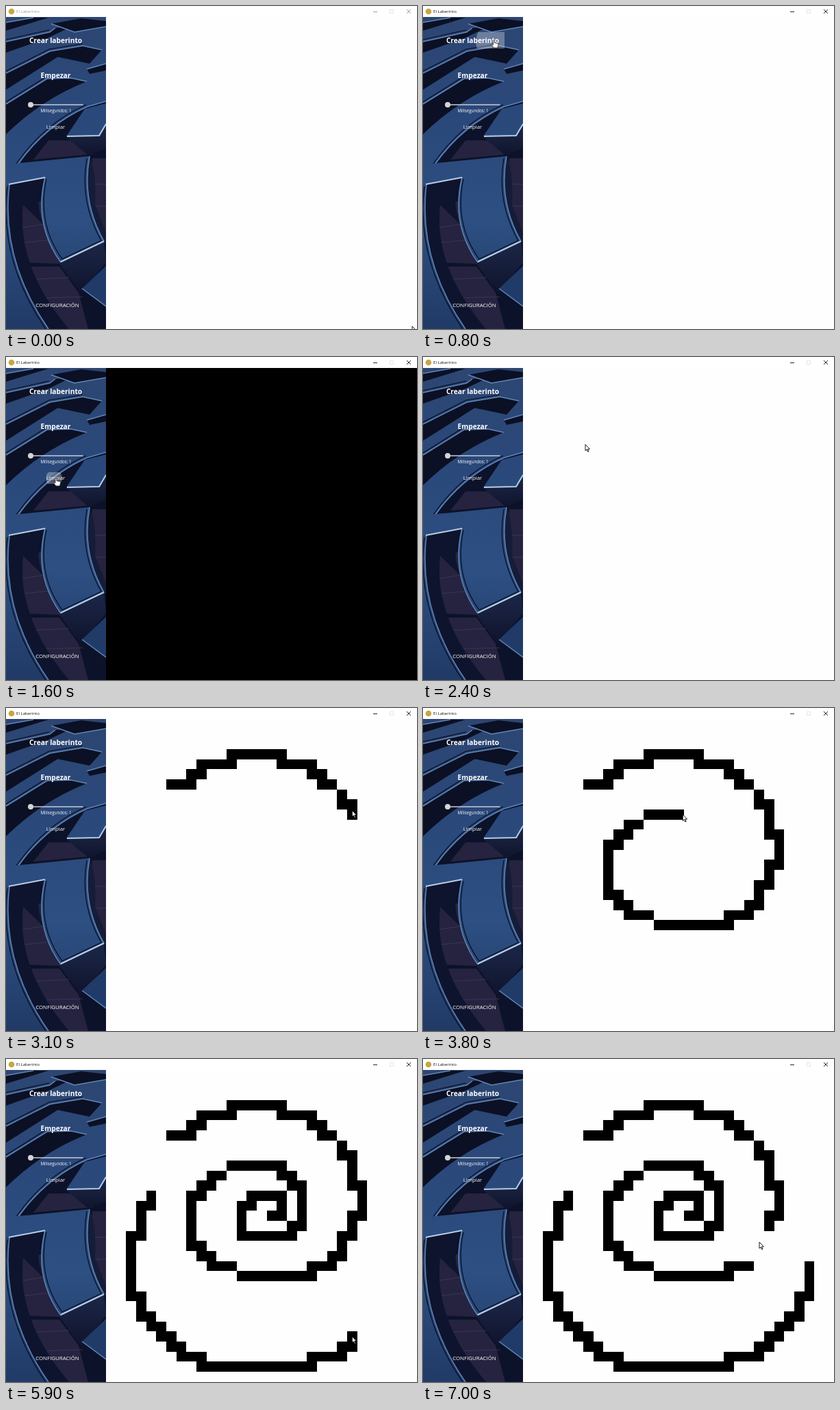
Animation of 600 by 471 pixels, one loop 7.1 s. Source, as an HTML page:

```html
<!DOCTYPE html>
<html lang="es">
<head>
<meta charset="utf-8">
<title>El Laberinto</title>
<style>
html, body { margin: 0; width: 100%; height: 100%; overflow: hidden; background: #fff; }
svg { display: block; width: 600px; height: 471px; }
text { font-family: "Open Sans", "Noto Sans", sans-serif; }
.side text { fill: #fff; text-anchor: middle; }
.bold { font-weight: 700; font-size: 10.2px; }
.top { fill: url(#steel); }
.rim { fill: none; stroke: #5f86ba; stroke-width: 1.5; }
.shine { fill: none; stroke: #b9cde6; stroke-width: 2; }
.seam { fill: none; stroke: #070b1c; stroke-width: 1.2; }
</style>
</head>
<body>
<svg viewBox="0 0 600 471">
  <defs>
    <linearGradient id="steel" gradientUnits="userSpaceOnUse" x1="0" y1="16" x2="0" y2="471">
      <stop offset="0" stop-color="#2d4672"/>
      <stop offset=".3" stop-color="#2a487a"/>
      <stop offset=".65" stop-color="#2d4f82"/>
      <stop offset="1" stop-color="#213a66"/>
    </linearGradient>
    <linearGradient id="face" x1="0" y1="0" x2="0" y2="1">
      <stop offset="0" stop-color="#1b2748"/>
      <stop offset="1" stop-color="#10142c"/>
    </linearGradient>
    <clipPath id="frame"><path d="M0 16H146V471H0Z"/></clipPath>
    <clipPath id="buttonClip"><rect id="clipBox"/></clipPath>
  </defs>

  <rect width="600" height="16" fill="#fff"/>
  <circle cx="8" cy="8" r="4.300" fill="#c6a544"/>
  <g id="chrome">
    <text x="15" y="10.400" font-size="6.100">El Laberinto</text>
    <path d="M536 8.500H542M585 5L591 11M591 5L585 11" fill="none" stroke="currentColor" stroke-width=".9"/>
  </g>
  <path d="M560.500 5.500h5v5h-5z" fill="none" stroke="#dcdcdc" stroke-width=".7"/>

  <rect id="pane" x="146" y="16" width="454" height="455"/>
  <path id="walls" shape-rendering="crispEdges"/>

  <g class="side" clip-path="url(#frame)">
    <rect y="16" width="146" height="455" fill="#0c1229"/>
    <g fill="#25233f">
      <path d="M24 290L54 284 62 340 80 376 24 374Z"/>
      <path d="M24 380H78L106 418 120 471H66Q34 420 24 380Z"/>
      <path d="M126 222H146V334L136 322Q120 280 126 222Z"/>
      <path d="M62 196L100 196 128 216 40 224Z"/>
    </g>
    <path d="M24 323L56 318M26 345L66 341M30 399L92 396M42 426L112 424M126 260H146M128 292H146" stroke="#393655" fill="none"/>

    <path class="top" d="M0 16H146V139L118 147Q58 174 18 230L0 232Z"/>
    <g fill="#0b1024">
      <path d="M0 24L40 17H62L0 36Z"/>
      <path d="M66 26L110 18 146 22V30L100 38Z"/>
      <path d="M0 52L64 38 72 32 96 30 60 47 0 68Z"/>
      <path d="M0 98L64 66 76 74 0 122Z"/>
      <path d="M64 66L112 58 140 64 122 84 74 74Z"/>
      <path d="M118 92L146 84V94L122 99Z"/>
      <path d="M0 143L60 106 95 105 118 110Q52 136 0 187Z"/>
    </g>
    <path class="rim" d="M0 24L40 17M0 52L64 38 72 32M66 26L100 38 146 30M0 98L64 66 112 58 140 64M118 92L146 84M0 143L60 106 95 105 118 110M18 230Q58 174 118 147L146 139"/>
    <path class="seam" d="M0 49L63 35M0 95L63 63 112 55M0 140L59 103M15 230Q56 171 117 144"/>

    <path class="top" d="M88 190L115 150 146 142V172L136 189Z"/>
    <path d="M88 191L136 190 146 174V208L120 218Z" fill="url(#face)"/>
    <path class="shine" stroke-width="1.400" d="M89 190L136 189 146 172"/>

    <path d="M122 219Q132 240 130 290L146 330V346L143 343Q111 285 122 219Z" fill="#151c38"/>
    <path d="M4 260L55 251Q40 280 54 318L25 290Q15 380 92 471H62Q-8 370 4 260Z" fill="#0e142d"/>
    <path class="top" d="M0 231L122 219Q110 285 143 343L80 374Q40 318 57 250L4 260 0 262Z"/>
    <path class="top" d="M0 262L4 260Q-8 370 62 471H0Z"/>
    <path d="M80 374L143 343 146 374 109 418 78 376Z" fill="url(#face)"/>
    <path d="M111 412L146 379V438Z" fill="#213b68"/>
    <path class="rim" d="M122 219Q110 285 143 343M80 374Q40 318 57 250M5 260Q-8 370 62 471M111 412L146 438"/>
    <path class="seam" d="M118 222Q107 285 139 342L82 369Q45 318 59 252M2 263Q-11 370 58 471"/>
    <path class="shine" d="M4 260L57 250M80 373L143 343"/>

    <circle id="ripple" fill="#fff" clip-path="url(#buttonClip)"/>
    <text class="bold" x="72.500" y="53.700">Crear laberinto</text>
    <text class="bold" x="72.500" y="104.700">Empezar</text>
    <path d="M36 144H112.500" stroke="#c8ccd4" stroke-width="1.300"/>
    <circle cx="36" cy="144" r="4" fill="#d5d5d5"/>
    <text x="73" y="155.300" font-size="6.200">Milisegundos: 1</text>
    <text x="72.500" y="179.300" font-size="7.800">Limpiar</text>
    <text x="75" y="438.700" font-size="7.900">CONFIGURACIÓN</text>
  </g>

  <g id="cursor" stroke-width=".9" stroke-linejoin="round">
    <path id="arrow" fill="#fff" stroke="#000" d="M0 0V9.200L2.100 7.200 3.600 10.700 5 10.100 3.500 6.700H6.400Z"/>
    <path id="hand" fill="#fff" stroke="#333" d="M-1 .8Q0-.6 1 .8V4.600L5.500 5.500Q6.800 6 6.500 7.600L5.500 12H-.2L-3.300 7.800Q-3.400 6.200-1 7.500Z"/>
  </g>
</svg>
<script>
const LOOP = 7100, STEP = 100, CELL = 44 / 3, LEFT = 146, TOP = 16;
const $ = id => document.getElementById(id);

const DIRS = {
  R: [1, 0], L: [-1, 0], U: [0, -1], D: [0, 1],
  E: [1, 1], Q: [-1, -1], P: [1, -1]
};

// Expands "R2 U ..." into the list of visited cells.
function trace(x, y, runs) {
  const cells = [[x, y]];
  for (const run of runs.split(' ')) {
    const [dx, dy] = DIRS[run[0]];
    for (let n = +(run.slice(1) || 1); n--;) cells.push([x += dx, y += dy]);
  }
  return cells;
}

// Keys pair a time with a position along the cells.
const strokes = [
  {
    cells: trace(6, 6, 'R2 U R U R3 U R5 D R3 D R D R E D R D3 R D3 L D2 L D2 L D L2 D L7 Q L2 U L U L U5 R U R U R P ' +
      'R5 D R D R D4 L D L5 U3 R U R3 D2 L'),
    keys: [[2500, 0], [3250, 32], [3800, 71.4], [4000, 75], [4700, 99]]
  },
  {
    cells: trace(4, 12, 'D L D3 L D6 R D2 R D R D R D R D R2 D R11 U R3 U R U R U R U R U2 R U3'),
    keys: [[5150, 0], [5600, 33], [6200, 55]]
  },
  {
    cells: trace(24, 16, 'L D2 L'),
    keys: [[6500, 0], [6850, 4]],
    erase: true
  }
];

const moves = [
  [0, 593, 467], [700, 103.5, 49], [900, 103.5, 49], [1500, 73, 176], [1700, 73, 176],
  [2400, 237, 127.5], [2500, 241, 111], [4700, 388, 229], [4800, 388, 229],
  [5100, 222, 193], [5150, 212, 199], [6200, 564, 302], [6400, 505, 240],
  [6500, 505, 258], [6850, 476, 288], [7000, 491, 267]
];

const buttons = [[26, 38, 93, 24], [26, 89, 93, 24], [59, 168, 28, 17]];
const presses = [
  { at: 700, x: 105, y: 52, speed: .28, box: buttons[0] },
  { at: 1500, x: 70, y: 177, speed: .12, box: buttons[2] }
];

const smooth = u => (1 - Math.cos(Math.PI * u)) / 2;

// Interpolates rows of [time, ...values].
function at(keys, t, ease = u => u) {
  if (t <= keys[0][0]) return keys[0].slice(1);
  const i = keys.findIndex(k => k[0] > t);
  if (i < 0) return keys[keys.length - 1].slice(1);
  const a = keys[i - 1], b = keys[i], u = ease((t - a[0]) / (b[0] - a[0]));
  return a.slice(1).map((v, j) => v + (b[j + 1] - v) * u);
}

const centre = ([x, y]) => [LEFT + (x + .5) * CELL, TOP + (y + .5) * CELL];

function pointer(t) {
  for (const { cells, keys } of strokes) {
    if (t < keys[0][0] || t > keys[keys.length - 1][0]) continue;
    const [p] = at(keys, t), i = Math.min(Math.floor(p), cells.length - 2);
    const a = centre(cells[i]), b = centre(cells[i + 1]);
    return a.map((v, j) => v + (b[j] - v) * (p - i));
  }
  return at(moves, t, smooth);
}

function wallPath(t) {
  const filled = new Map();
  for (const { cells, keys, erase } of strokes) {
    if (t < keys[0][0]) continue;
    for (const cell of cells.slice(0, Math.round(at(keys, t)[0]) + 1)) {
      if (erase) filled.delete(String(cell));
      else filled.set(String(cell), cell);
    }
  }
  return [...filled.values()].map(([x, y]) =>
    `M${LEFT + x * CELL} ${TOP + y * CELL}h${CELL}v${CELL}h${-CELL}z`).join('');
}

function set(el, attrs) {
  for (const name in attrs) el.setAttribute(name, attrs[name]);
}

function drawRipple(t) {
  const press = presses.find(p => t >= p.at && t < p.at + 400);
  if (!press) return set($('ripple'), { r: 0 });
  const age = t - press.at, [x, y, width, height] = press.box;
  set($('clipBox'), { x, y, width, height });
  set($('ripple'), {
    cx: press.x, cy: press.y, r: age * press.speed,
    opacity: .3 * Math.min(1, (400 - age) / 300)
  });
}

function draw(t) {
  const [x, y] = pointer(t);
  const over = buttons.some(([bx, by, w, h]) => x > bx && x < bx + w && y > by && y < by + h);
  const tone = t < 700 ? '#999' : '#111';
  set($('chrome'), { fill: tone, color: tone });
  set($('pane'), { fill: t >= 900 && t < 1700 ? '#000' : '#fefeff' });
  set($('walls'), { d: wallPath(t) });
  set($('cursor'), { transform: `translate(${x} ${y})` });
  set($('arrow'), { visibility: over ? 'hidden' : 'visible' });
  set($('hand'), { visibility: over ? 'visible' : 'hidden' });
  drawRipple(t);
}

const start = performance.now();
function tick() {
  const t = (performance.now() - start) % LOOP;
  draw(Math.floor(t / STEP) * STEP);
  requestAnimationFrame(tick);
}
tick();
</script>
</body>
</html>
```
